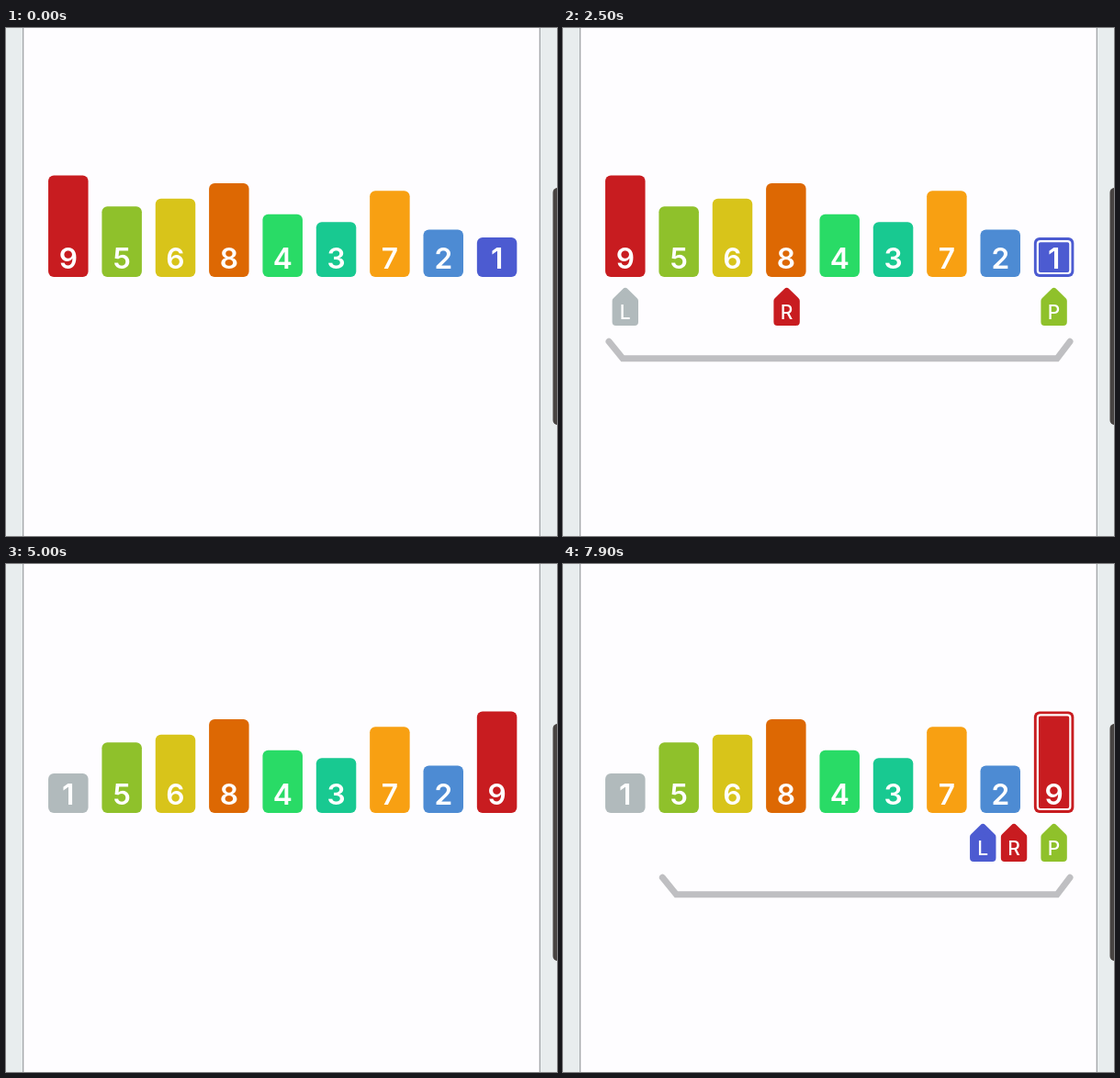
Write an HTML page that moves like this. It is 600 px wide and 553 px high and loops after 8000 ms.

```html
<!DOCTYPE html>
<html lang="en">
<head>
<meta charset="utf-8">
<title>Quicksort</title>
<style>
  html, body { margin: 0; width: 100%; height: 100%; overflow: hidden; background: #fefdff; }
  svg { display: block; width: 600px; height: 553px; }
  text { font-family: Inter, "Open Sans", sans-serif; fill: #fff; text-anchor: middle; }
  .digit { font-size: 31.7px; font-weight: 600; }
  .letter { font-size: 21px; font-weight: 500; }
</style>
</head>
<body>
<svg id="stage" viewBox="0 0 600 553">
  <rect width="600" height="553" fill="#fefdff"/>
  <rect width="18.5" height="553" fill="#e8edee"/>
  <rect x="581.5" width="18.5" height="553" fill="#e8edee"/>
  <rect x="18" width="1.3" height="553" fill="#a2a6a8"/>
  <rect x="580.7" width="1.3" height="553" fill="#a2a6a8"/>
  <rect x="595.5" y="174" width="20" height="258" rx="5" fill="#484442"/>
</svg>
<script>
const LOOP = 8000, FLOOR = 271, BAR_W = 43.5;
const GRAY = [177, 186, 188], BLUE = [76, 91, 209], RED = [200, 28, 32], GREEN = [143, 193, 43];
const COLORS = [BLUE, [77, 139, 211], [24, 201, 145], [41, 219, 102], GREEN,
                [216, 196, 26], [248, 160, 18], [221, 104, 3], RED];
const ORDER = [9, 5, 6, 8, 4, 3, 7, 2, 1];
const stage = document.getElementById("stage");

const center = i => 67.8 + 58.35 * i;
const lerp = (a, b, p) => a + (b - a) * p;
const ramp = (t, a, b) => Math.min(1, Math.max(0, (t - a) / (b - a)));
const ease = p => p < 0.5 ? 4 * p ** 3 : 1 - 4 * (1 - p) ** 3;
const mix = (a, b, p) => `rgb(${a.map((v, i) => Math.round(lerp(v, b[i], p)))})`;

function el(parent, tag, attrs, text) {
  const node = document.createElementNS("http://www.w3.org/2000/svg", tag);
  set(node, attrs);
  if (text !== undefined) node.textContent = text;
  return parent.appendChild(node);
}
function set(node, attrs) {
  for (const k in attrs) node.setAttribute(k, attrs[k]);
}

// Position on a row of stops; stop i is left at times[i].
function walk(t, times, stops) {
  let x = stops[0];
  for (let i = 1; i < stops.length; i++)
    x += (stops[i] - stops[i - 1]) * ease(ramp(t, times[i - 1], times[i]));
  return x;
}

function makeBar(value) {
  const h = 34.5 + 8.45 * value, color = COLORS[value - 1];
  const node = el(stage, "g", {});
  const body = el(node, "rect", { x: -BAR_W / 2, y: -h, width: BAR_W, height: h, rx: 6, fill: mix(color, color, 0) });
  const frame = el(node, "rect", { x: 4 - BAR_W / 2, y: 4 - h, width: BAR_W - 8, height: h - 8, rx: 3,
    fill: "none", stroke: "#fff", "stroke-width": 2.2, opacity: 0 });
  el(node, "text", { class: "digit", x: 0, y: -9 }, value);
  return { node, body, frame, color };
}

function makeMarker(letter) {
  const node = el(stage, "g", {});
  const body = el(node, "path", { "stroke-width": 8, "stroke-linejoin": "round" });
  el(node, "text", { class: "letter", x: 0, y: 317.3 }, letter);
  return { node, body };
}

// lean moves the roof peak: 1 to the right edge, -1 to the left edge.
function drawMarker(m, x, opacity, color, lean = 0) {
  const w = 10.2, low = 297, peak = 287;
  const left = lerp(low, peak, Math.max(0, -lean)), right = lerp(low, peak, Math.max(0, lean));
  set(m.node, { transform: `translate(${x})`, opacity });
  set(m.body, { d: `M${-w} 320V${left}L${lean * w} ${peak}L${w} ${right}V320Z`, fill: color, stroke: color });
}

const bracket = el(stage, "path", { fill: "none", stroke: "#bfbfc2", "stroke-width": 7, "stroke-linecap": "round" });
const bars = ORDER.map(makeBar);
const [markL, markR, markP] = ["L", "R", "P"].map(makeMarker);
const first = bars[0], last = bars[8];
const stops = (from, to) => {
  const dir = Math.sign(to - from);
  return Array.from({ length: Math.abs(to - from) + 1 }, (_, i) => center(from + i * dir));
};

const ROUNDS = [
  { low: 0,
    L: [[3460, 3860], [center(0), 51]],
    R: [[960, 1360, 1760, 2160, 2560, 3010, 3460, 3860], [...stops(7, 1), 83]] },
  { low: 1,
    L: [[5535, 5950, 6365, 6785, 7195, 7600, 8000], [...stops(1, 6), 459.8]],
    R: [[7600, 8000], [center(7), 492]] }
];

function render(t) {
  const second = t >= 5070;
  const round = ROUNDS[second ? 1 : 0];
  const shown = second ? ramp(t, 5130, 5480) : ramp(t, 40, 420);
  const marks = second ? shown : shown * (1 - ramp(t, 4650, 4810));
  const settled = ramp(t, 4810, 5000);

  // Pivot swap on two opposite arcs
  const p = ease(ramp(t, 4239, 4739));
  const arc = 28.6 * Math.sin(Math.PI * p);
  bars.forEach((b, i) => {
    const x = i === 0 ? lerp(center(0), center(8), p) : i === 8 ? lerp(center(8), center(0), p) : center(i);
    const dy = i === 0 ? arc : i === 8 ? -arc : 0;
    set(b.node, { transform: `translate(${x} ${FLOOR + dy})` });
  });
  set(last.body, { fill: mix(BLUE, GRAY, settled) });
  set(last.frame, { opacity: ramp(t, 40, 420) * (1 - settled) });
  set(first.frame, { opacity: second ? shown : 0 });

  const x0 = center(round.low) - 17.8;
  set(bracket, {
    d: `M${x0} 341.3L${x0 + 15} 359.8H538L552 341.3`,
    opacity: second ? shown : shown * (1 - settled)
  });

  const met = second ? 0 : ramp(t, 3940, 4140);
  const stopped = second ? 0 : ramp(t, 460, 680);
  drawMarker(markL, walk(t, ...round.L), marks, mix(BLUE, GRAY, stopped), met);
  drawMarker(markR, walk(t, ...round.R), marks, mix(RED, GRAY, met), -met);
  drawMarker(markP, center(8), marks, mix(GREEN, GREEN, 0));
}

const start = performance.now();
function tick() {
  render((performance.now() - start) % LOOP);
  requestAnimationFrame(tick);
}
tick();
</script>
</body>
</html>
```
